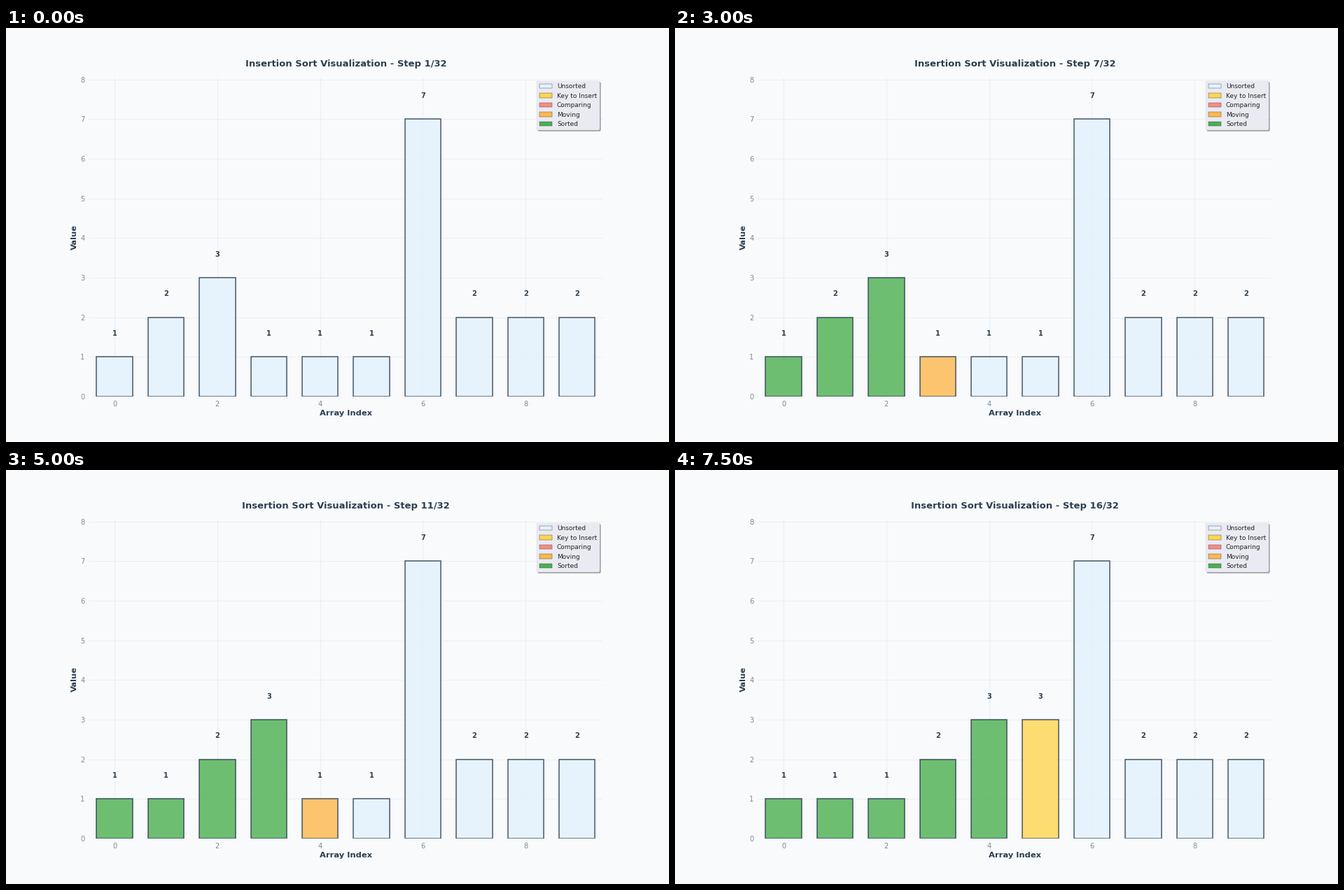
Recreate the animation shown at these times as a matplotlib script. Size 947 px wide and 592 px high, loop 8000 ms.

```python
import matplotlib.pyplot as plt
from matplotlib.animation import FuncAnimation
from matplotlib.patches import Patch

W, H, DPI = 947, 592, 59.2
DATA = [1, 2, 3, 1, 1, 1, 7, 2, 2, 2]
SHOWN, INTERVAL = 16, 500

BG, INK, MUTED = "#F8FAFC", "#2C3E50", "#7F8C8D"
COLORS = {
    "Unsorted": "#E3F2FD",
    "Key to Insert": "#FFD54F",
    "Comparing": "#FF8A80",
    "Moving": "#FFB74D",
    "Sorted": "#4CAF50",
}


def snapshot(values, done=0, active=None, role=None):
    """Copy of the values with one role name per bar."""
    roles = ["Sorted" if k < done else "Unsorted" for k in range(len(values))]
    if active is not None:
        roles[active] = role
    return list(values), roles


def insertion_steps(data):
    a = list(data)
    yield snapshot(a)
    for i in range(1, len(a)):
        key, j = a[i], i
        yield snapshot(a, 0, i, "Key to Insert")
        if a[i - 1] > key:
            yield snapshot(a, i, i, "Moving")
            a[i] = a[i - 1]
            yield snapshot(a, i, i, "Key to Insert")
            while j > 0 and a[j - 1] > key:
                a[j] = a[j - 1]
                j -= 1
            a[j] = key
        yield snapshot(a, i + 1)
    yield snapshot(a, len(a))


steps = list(insertion_steps(DATA))

plt.rcParams["font.family"] = "DejaVu Sans"
# the small margin keeps the pixel size from rounding down
fig, ax = plt.subplots(figsize=((W + 0.01) / DPI, (H + 0.01) / DPI), dpi=DPI)
fig.subplots_adjust(left=0.125, right=0.9, bottom=0.11, top=0.88)
fig.set_facecolor(BG)
ax.set_facecolor(BG)
ax.set_xlim(-0.5, len(DATA) - 0.5)
ax.set_ylim(0, max(DATA) * 1.15)
ax.set_xticks(range(0, len(DATA), 2))
ax.set_yticks(range(max(DATA) + 2))
ax.tick_params(length=0, pad=7, labelsize=12, labelcolor=MUTED)
ax.spines[:].set_visible(False)
ax.set_axisbelow(True)
ax.grid(True, color="#BDC3C7", alpha=0.3, linewidth=0.8)

label_font = dict(fontsize=14, fontweight="bold", color=INK)
ax.set_xlabel("Array Index", **label_font)
ax.set_ylabel("Value", **label_font)
title = ax.set_title("", fontsize=16, fontweight="bold", color=INK, pad=20)

bars = ax.bar(range(len(DATA)), DATA, width=0.7, alpha=0.8,
              edgecolor=INK, linewidth=2)
labels = [ax.text(k, v, "", ha="center", va="bottom", fontsize=12,
                  fontweight="bold", color=INK) for k, v in enumerate(DATA)]

handles = [Patch(facecolor=c, edgecolor=INK, linewidth=0.5, label=name)
           for name, c in COLORS.items()]
legend = ax.legend(handles=handles, loc="upper right", fontsize=11,
                   frameon=True, fancybox=True, shadow=True, framealpha=1,
                   facecolor="#EAEAF2", edgecolor="0.8", labelcolor="0.15")
legend.get_frame().set_linewidth(0.3)


def update(n):
    values, roles = steps[n]
    for bar, label, value, role in zip(bars, labels, values, roles):
        bar.set_height(value)
        bar.set_facecolor(COLORS[role])
        label.set_y(value + 0.5)
        label.set_text(str(value))
    title.set_text(f"Insertion Sort Visualization - Step {n + 1}/{len(steps)}")
    return [*bars, *labels, title]


anim = FuncAnimation(fig, update, frames=SHOWN, interval=INTERVAL,
                     repeat=True, repeat_delay=0, blit=False)
plt.show()
```
